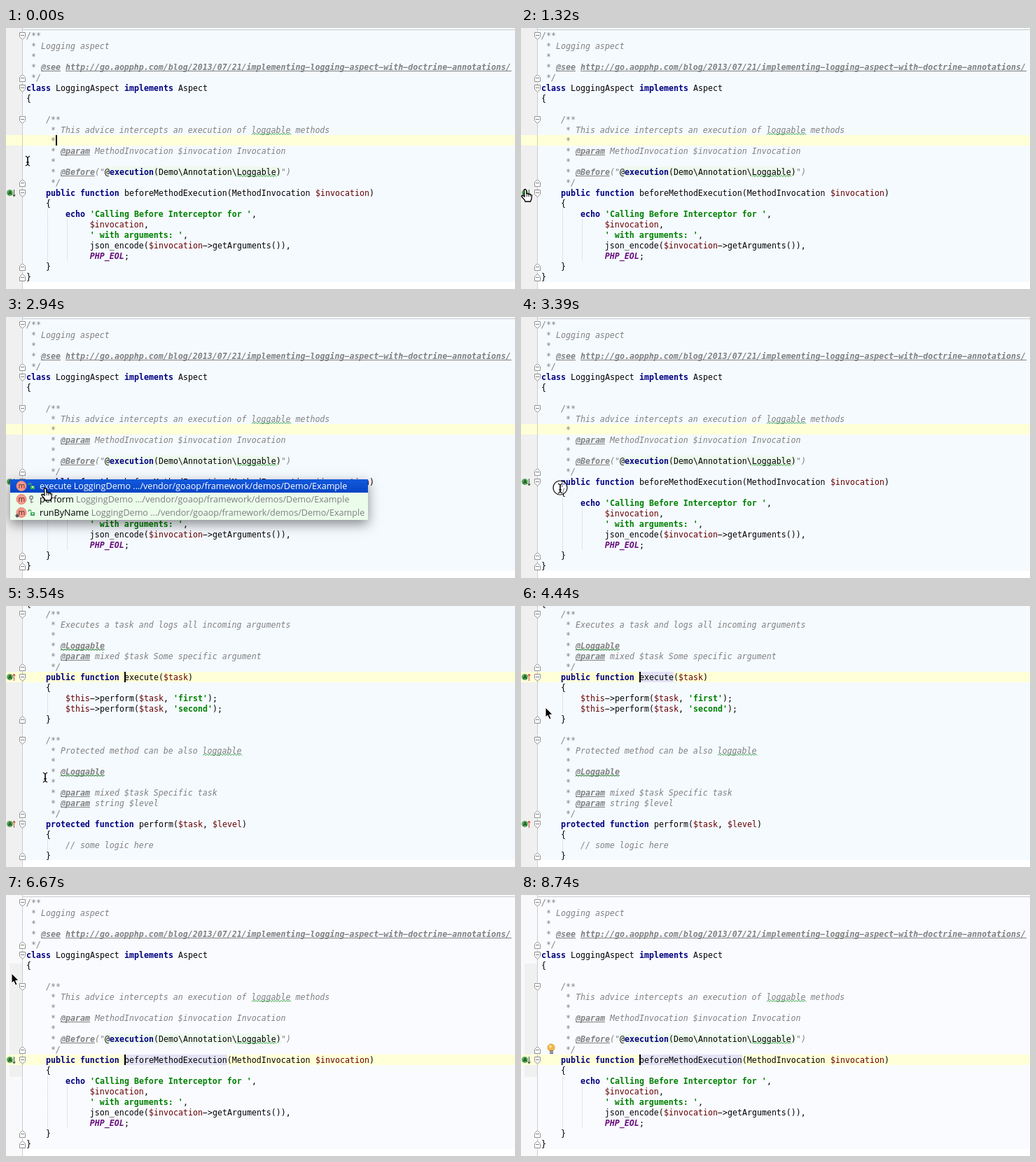
These frames come from a looping animation (727 px wide and 373 px high, 8890 ms). An HTML page with a canvas:

```html
<!DOCTYPE html>
<html lang="en">
<head>
<meta charset="utf-8">
<title>Aspect navigation</title>
<style>
  html, body { margin: 0; width: 100%; height: 100%; overflow: hidden; background: #fff; }
  canvas { display: block; }
</style>
</head>
<body>
<canvas id="stage" width="727" height="373"></canvas>
<script>
const ctx = document.getElementById('stage').getContext('2d');
const W = 727, H = 373, LOOP = 8890, TICKS = 60;
const LEFT = 29, COL = 7, ROW = 15, FOLD_X = 23;
const MONO = '11.627px "DejaVu Sans Mono", monospace';
const SANS = '12.6px "Open Sans", "Noto Sans", sans-serif';

// A tag such as ~k inside a line switches the style.
const STYLES = {
  n: ['', '#000'],
  k: ['bold', '#000080'],
  c: ['italic', '#808080'],
  t: ['italic bold', '#808080'],
  v: ['', '#660000'],
  s: ['bold', '#008000'],
  p: ['italic bold', '#660e7a']
};

const aspectLines = String.raw`~c/**
~c * Logging aspect
~c *
~c * ~t@see~c ~thttp://go.aopphp.com/blog/2013/07/21/implementing-logging-aspect-with-doctrine-annotations/
~c */
~kclass ~nLoggingAspect ~kimplements ~nAspect
~n{

~c    /**
~c     * This advice intercepts an execution of loggable methods
~c     *
~c     * ~t@param~c MethodInvocation $invocation Invocation
~c     *
~c     * ~t@Before~c("~n@~kexecution~n(Demo\Annotation\Loggable)~c")
~c     */
~k    public function ~nbeforeMethodExecution(MethodInvocation ~v$invocation~n)
~n    {
~k        echo ~s'Calling Before Interceptor for '~n,
~v             $invocation~n,
~s             ' with arguments: '~n,
~n             json_encode(~v$invocation~n->getArguments()),
~p             PHP_EOL~n;
~n    }
~n}`.split('\n');

const demoLines = String.raw`~c    /**
~c     * Executes a task and logs all incoming arguments
~c     *
~c     * ~t@Loggable
~c     * ~t@param~c mixed $task Some specific argument
~c     */
~k    public function ~nexecute(~v$task~n)
~n    {
~v        $this~n->perform(~v$task~n, ~s'first'~n);
~v        $this~n->perform(~v$task~n, ~s'second'~n);
~n    }

~c    /**
~c     * Protected method can be also loggable
~c     *
~c     * ~t@Loggable
~c     *
~c     * ~t@param~c mixed $task Specific task
~c     * ~t@param~c string $level
~c     */
~k    protected function ~nperform(~v$task~n, ~v$level~n)
~n    {
~c        // some logic here
~n    }`.split('\n');

const aspect = {
  lines: aspectLines, top: 3, separator: true,
  starts: [0, 5, 8, 15], ends: [4, 14, 22, 23],
  waves: [[9, 46, 8], [13, 43, 8]], // row, column, length
  guides: [[59, 17, 22], [87, 18, 22]], // x, first row, end row
  injected: [13, 16, 36],
  icons: [15], arrow: 'down'
};
const demo = {
  lines: demoLines, top: 4,
  starts: [0, 6, 12, 20], ends: [5, 10, 19, 23],
  waves: [[3, 7, 9], [13, 36, 8], [15, 7, 9]],
  guides: [[59, 8, 10], [59, 22, 23]],
  icons: [6, 20], arrow: 'up'
};

function rect(x, y, w, h, color) {
  ctx.fillStyle = color;
  ctx.fillRect(x, y, w, h);
}

function poly(points, fill, stroke, width = 1) {
  ctx.beginPath();
  points.forEach(([x, y]) => ctx.lineTo(x, y));
  ctx.closePath();
  if (fill) { ctx.fillStyle = fill; ctx.fill(); }
  if (stroke) { ctx.strokeStyle = stroke; ctx.lineWidth = width; ctx.stroke(); }
}

function line(points, color, width = 1) {
  ctx.beginPath();
  points.forEach(([x, y]) => ctx.lineTo(x, y));
  ctx.strokeStyle = color;
  ctx.lineWidth = width;
  ctx.stroke();
}

function disc(x, y, r, fill, stroke, width = 1) {
  ctx.beginPath();
  ctx.arc(x, y, r, 0, Math.PI * 2);
  ctx.fillStyle = fill;
  ctx.fill();
  if (stroke) { ctx.strokeStyle = stroke; ctx.lineWidth = width; ctx.stroke(); }
}

function label(text, x, y, font, color) {
  ctx.font = font;
  ctx.fillStyle = color;
  ctx.fillText(text, x, y);
}

function dotted(x, y0, y1, color) {
  ctx.setLineDash([1, 1]);
  line([[x + .5, y0], [x + .5, y1]], color);
  ctx.setLineDash([]);
}

function codeLine(source, baseline) {
  let col = 0;
  const parts = source.split(/~([a-z])/);
  for (let i = 1; i < parts.length; i += 2) {
    const [face, color] = STYLES[parts[i]], text = parts[i + 1];
    const x = LEFT + col * COL;
    // The minus sign gives the wide dash of the editor font.
    label(text.replace(/-/g, '\u2212'), x, baseline, face + ' ' + MONO, color);
    if (parts[i] === 't') rect(x, baseline + 1, text.length * COL, 1, color);
    col += text.length;
  }
}

function wave(x, y, width) {
  const points = [];
  for (let i = 0; i <= width; i += 2) points.push([x + i, y + (i % 4 ? 0 : 2)]);
  line(points, '#30a040');
}

function foldMark(y, dir) {
  const outline = [[-4, -5], [4, -5], [4, 1], [0, 5], [-4, 1]];
  poly(outline.map(([dx, dy]) => [FOLD_X + .5 + dx, y + dy * dir + .5]), '#fff', '#909090');
  rect(FOLD_X - 2, y - (dir > 0 ? 1 : 0), 5, 1, '#808080');
}

function gutterIcon(y, arrow) {
  disc(5.5, y - .5, 4.5, '#5aa75a');
  label('A', 3, y + 2, 'bold 7px "DejaVu Sans", sans-serif', '#174f20');
  const up = arrow === 'up', color = up ? '#d04a35' : '#355a3c';
  line([[11.5, y - 5], [11.5, y + 5]], color);
  const tip = up ? y - 5 : y + 5, back = up ? 3 : -3;
  line([[9.5, tip + back], [11.5, tip], [13.5, tip + back]], color);
}

function bulb(y) {
  disc(43, y + 6, 5, '#f5b94a', '#d9993a');
  disc(42, y + 4.5, 2, '#ffdf96');
  rect(41, y + 10, 5, 5, '#777');
  rect(41, y + 12, 5, 1, '#ccc');
}

function editor(view, state) {
  const { top } = view;
  const yOf = row => top + row * ROW;
  rect(0, 0, W, H, '#fff');
  rect(FOLD_X, 0, W - FOLD_X, 363, state.pale ? '#f9fbff' : '#f5faff');
  rect(0, 0, FOLD_X, H, state.pale ? '#f9f9fb' : '#f0f0f0');
  if (state.pale) rect(5, 98, 18, 162, '#f0f0f0');
  if (view.separator) rect(FOLD_X, 2, W - FOLD_X, 1, '#c8cacc');
  rect(0, yOf(state.row), W, ROW, '#ffffd7');

  if (view.injected) {
    const [row, col, length] = view.injected;
    rect(LEFT + col * COL, yOf(row), length * COL, ROW, '#eef9ee');
  }
  if (state.mark) rect(LEFT + state.col * COL, yOf(state.row), state.mark * COL, ROW, '#e2e2f5');

  view.guides.forEach(([x, a, b]) => dotted(x, yOf(a), yOf(b), '#c8ced4'));
  dotted(FOLD_X, 0, H, '#a0a0a0');
  if (view === demo) codeLine('~n{', yOf(-1) + 12);
  view.lines.forEach((text, row) => codeLine(text, yOf(row) + 12));
  view.waves.forEach(([row, col, n]) => wave(LEFT + col * COL, yOf(row) + 12.5, n * COL));
  view.starts.forEach(row => foldMark(yOf(row) + 8, 1));
  view.ends.forEach(row => foldMark(yOf(row) + 8, -1));
  view.icons.forEach(row => gutterIcon(yOf(row) + 8, view.arrow));
  if (state.bulb) bulb(yOf(state.row) - 16);
  if (state.caret) rect(LEFT + state.col * COL, yOf(state.row), 2, ROW, '#000');
}

function lock(x, y) {
  ctx.beginPath();
  ctx.arc(x - 2, y - 2, 2, Math.PI, 0);
  ctx.strokeStyle = '#3fae5a';
  ctx.lineWidth = 1.3;
  ctx.stroke();
  rect(x - 1, y - 1, 6, 5, '#3fae5a');
  rect(x + 1, y, 2, 2, '#e6ffe6');
}

function keyIcon(x, y) {
  disc(x, y - 3, 2.3, '#eee', '#808080', 1.4);
  line([[x, y - 1], [x, y + 5]], '#808080', 1.4);
  line([[x, y + 3.5], [x + 3, y + 3.5]], '#808080');
}

function popup() {
  const x = 6, y = 232, w = 511, h = 58, row = 19;
  ctx.save();
  ctx.shadowColor = 'rgba(0,0,0,.45)';
  ctx.shadowBlur = 16;
  ctx.shadowOffsetY = 6;
  rect(x, y, w, h, '#ebfceb');
  ctx.restore();
  const blue = ctx.createLinearGradient(0, y, 0, y + row);
  blue.addColorStop(0, '#1459dc');
  blue.addColorStop(1, '#0444c4');
  rect(x, y, w, row, blue);
  ['execute', 'perform', 'runByName'].forEach((name, i) => {
    const mid = y + 10 + i * row;
    disc(22, mid - .5, 7, '#f59a8b', '#e98475');
    label('m', 17.5, mid + 3, '10px "DejaVu Sans", sans-serif', '#5c2a28');
    if (i === 1) keyIcon(36, mid); else lock(36, mid);
    if (i === 2) poly([[13, mid + 4], [16, mid + 1], [19, mid + 4], [16, mid + 7]], '#555');
    label(name, 48, mid + 4, SANS, i ? '#000' : '#fff');
    const after = 48 + ctx.measureText(name + ' ').width;
    label('LoggingDemo .../vendor/goaop/framework/demos/Demo/Example',
      after, mid + 4, SANS, i ? '#808080' : '#fff');
  });
}

const cursors = {
  beam(x, y) {
    const shape = [[[x - 3, y - 7], [x, y - 5], [x, y + 5], [x - 3, y + 7]],
      [[x + 3, y - 7], [x, y - 5], [x, y + 5], [x + 3, y + 7]], [[x - 2, y + 2], [x + 2, y + 2]]];
    shape.forEach(p => line(p, 'rgba(255,255,255,.8)', 3));
    shape.forEach(p => line(p, '#000', 1.1));
  },
  arrow(x, y) {
    const shape = [[0, 0], [0, 14], [3, 11.3], [5.6, 17], [8, 16], [5.6, 10.3], [10, 10]];
    poly(shape.map(([dx, dy]) => [x + dx, y + dy]), '#000', '#fff');
  },
  hand(x, y) {
    const shape = [[-1.5, 0], [.5, -.5], [1.5, 1], [2, 6], [4, 5.5], [5, 6.5], [7, 6.3],
      [8, 7.5], [9.5, 8], [9, 13], [7.5, 17], [0, 17], [-1, 14.5], [-5, 10], [-5, 8.5],
      [-3.5, 8.3], [-1, 10]];
    poly(shape.map(([dx, dy]) => [x + dx, y + dy]), '#fff', '#000', 1.3);
    [2, 4.5, 7].forEach(dx => line([[x + dx, y + 6.5], [x + dx, y + 10]], '#000', .8));
  }
};

// Pointer path: each stop is reached on its tick, moving since the given start tick.
const path = [
  { from: 0, at: 0, x: 31, y: 190 },
  { from: 1, at: 7, x: 6, y: 231 },
  { from: 16, at: 20, x: 56, y: 245 },
  { from: 26, at: 30, x: 35, y: 145 },
  { from: 30, at: 35, x: 8, y: 103 },
  { from: 44, at: 45, x: 8, y: 112 },
  { from: 45, at: 49, x: 380, y: 250 },
  { from: 51, at: 55, x: 640, y: 350 }
];

function pointer(k) {
  let pos = path[0];
  for (const stop of path.slice(1)) {
    if (k <= stop.from) break;
    const p = Math.min(1, (k - stop.from) / (stop.at - stop.from));
    pos = { x: pos.x + (stop.x - pos.x) * p, y: pos.y + (stop.y - pos.y) * p };
  }
  return pos;
}

function cursorKind(k, x) {
  if (k >= 7 && k < 23 || k >= 35 && k < 42) return 'hand';
  if (k >= 42) return x < 28 ? 'arrow' : 'beam';
  return x < 28 || k >= 30 ? 'arrow' : 'beam';
}

const blinks = [0, 3, 6, 9, 24, 27, 29, 32, 35, 38, 42, 49, 52, 56, 59];
const clicks = [12, 23, 41];

function draw(k) {
  const caret = blinks.filter(b => b <= k).length % 2 === 1;
  if (k < 24) {
    editor(aspect, { row: 10, col: 6, caret });
  } else if (k < 42) {
    editor(demo, { row: 6, col: 20, mark: k >= 25 ? 7 : 0, bulb: k >= 34, caret });
  } else {
    editor(aspect, { row: 15, col: 20, mark: k >= 43 ? 21 : 0, bulb: k >= 52, caret, pale: true });
  }
  if (k >= 13 && k < 23) popup();
  if (k >= 56) return;
  const { x, y } = pointer(k);
  if (clicks.includes(k)) disc(x, y - 1, 10, 'rgba(255,255,255,.55)', '#111', 1.2);
  cursors[cursorKind(k, x)](x, y);
}

function frame() {
  const t = performance.now() % LOOP;
  // Screen updates come in ticks, with a small lead for rounded delays.
  draw(Math.min(TICKS - 1, Math.floor((t + 24) * TICKS / LOOP)));
  requestAnimationFrame(frame);
}
frame();
</script>
</body>
</html>
```
